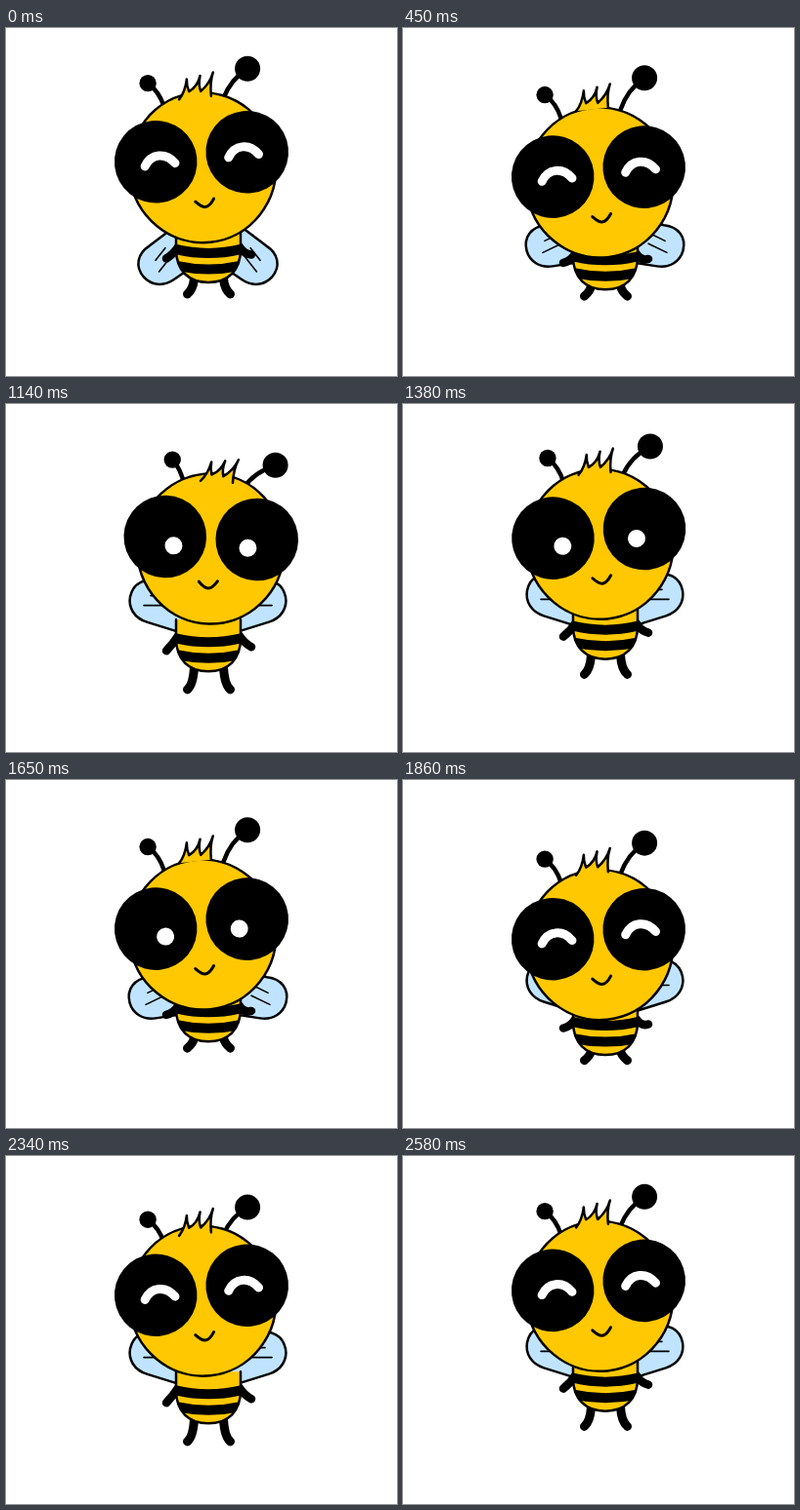
An HTML page with a canvas for the animation above (2.61 s loop, 400 by 357 pixels).

```html
<!DOCTYPE html>
<html lang="en">
<head>
<meta charset="utf-8">
<title>Hovering bee</title>
<style>
  html, body { margin: 0; width: 100%; height: 100%; overflow: hidden; background: #fff; }
  canvas { display: block; }
</style>
</head>
<body>
<canvas id="stage" width="400" height="357"></canvas>
<script>
const ctx = document.getElementById('stage').getContext('2d');
const LOOP = 2610, STEP = 30, BOB = 1200, FLAP = 120;
const YELLOW = '#ffc800', BLUE = '#c0e4ff', AXIS = 206.5;
const RAD = Math.PI / 180;

const wing = new Path2D('M24 18L56 8C69 4 75-7 73-18C70-32 58-38 44-33L10-24');
const wingLines = new Path2D('M36-19H52M38-9H59');
const torso = new Path2D('M174-54V-35C174-13 187-1 207-1S240-13 240-35V-54');
const stripes = new Path2D('M170-36Q207-26 244-36M170-19Q207-10 244-19');
const hair = new Path2D('M-15-132Q-8-139-5-152Q-6-145-4-139Q5-143 9-154Q6-145 8-138Q18-145 22.5-156Q18-146 18-132');
const mouth = new Path2D('M-9.5-26C-5-21-2.5-19.5 0-19.5S5.5-21 9.5-27');
const happyEye = new Path2D('M-15.5 3.5C-8-9 7-9 15.5 3.5');

// Vertical drop from the highest point; every part follows with its own lag.
const drop = (t, lag) => 13.3 * (1 - Math.cos(2 * Math.PI * Math.max(0, t - lag) / BOB));

// Head angle: resting to the left with one soft swing to the right.
function tilt(t) {
  const x = Math.max(-1, Math.min(1, (t - 980) / 440));
  return (-6.1 + 11.2 * Math.cos(x * Math.PI / 2) ** 2) * RAD;
}

function headPoint(x, y, t) {
  const a = tilt(t), c = Math.cos(a), s = Math.sin(a);
  return [206 + x * c - y * s, 203 + drop(t, 120) + x * s + y * c];
}

function paint(path, fill, stroke, width) {
  if (fill) {
    ctx.fillStyle = fill;
    ctx.fill(path);
  }
  if (stroke) {
    ctx.strokeStyle = stroke;
    ctx.lineWidth = width;
    ctx.stroke(path);
  }
}

function disc(x, y, r, color, ry = r) {
  const path = new Path2D();
  path.ellipse(x, y, r, ry, 0, 0, 2 * Math.PI);
  paint(path, color);
  return path;
}

function limb(x0, y0, cx, cy, x1, y1, width) {
  const path = new Path2D();
  path.moveTo(x0, y0);
  path.quadraticCurveTo(cx, cy, x1, y1);
  paint(path, null, '#000', width);
}

function at(x, y, draw) {
  ctx.save();
  ctx.translate(x, y);
  draw();
  ctx.restore();
}

function onHead(t, draw) {
  at(...headPoint(0, 0, t), () => {
    ctx.rotate(tilt(t));
    draw();
  });
}

function drawBody(t) {
  const fall = drop(t, 240), base = 262 + fall;
  const hand = 235.5 + drop(t, 290);
  const foot = 273 + drop(t, 340);
  const droop = 26 * RAD * (1 + Math.cos(2 * Math.PI * t / FLAP));

  for (const side of [-1, 1]) {
    at(AXIS, 209 + fall / 2, () => {
      ctx.scale(side, 1);
      ctx.translate(6.5, 0);
      ctx.rotate(droop);
      paint(wing, BLUE, '#000', 2.5);
      paint(wingLines, null, '#000', 1.6);
    });
    const x = dx => AXIS + 1 + side * dx;
    limb(x(31), base - 38, x(36), base - 30, x(43.5), hand - 1 - side * 2, 8.5);
    limb(x(15), base - 5, x(16), foot - 5, x(22), foot, 9);
  }

  at(0, base, () => {
    paint(torso, YELLOW);
    ctx.save();
    ctx.clip(torso);
    paint(stripes, null, '#000', 10);
    ctx.restore();
    paint(torso, null, '#000', 2.5);
  });
}

function drawAntenna(root, tip, r) {
  const [x0, y0] = root, [x1, y1] = tip;
  limb(x0, y0, x0 + (x1 - x0) * 0.3, y0 + (y1 - y0) * 0.65, x1, y1, 4.5);
  disc(x1, y1, r, '#000');
}

function drawHead(t) {
  const late = t - 50;
  drawAntenna(headPoint(-31, -126, late), headPoint(-45, -152, late), 8.7);
  drawAntenna(headPoint(30, -128, late), headPoint(58, -156, t - 85), 13);

  onHead(t, () => paint(disc(1.5, -60, 75, YELLOW, 77), null, '#000', 2.5));
  onHead(late, () => paint(hair, YELLOW, '#000', 2.5));

  const open = t >= 930 && t < 1860;
  onHead(t, () => {
    paint(mouth, null, '#000', 3);
    for (const [x, look] of [[-45.5, 1], [48.5, -1]]) {
      disc(x, -71, 42.3, '#000');
      if (open) disc(x + 9 * look, -62, 9, '#fff');
      else at(x + 4 * look, -71, () => paint(happyEye, null, '#fff', 9));
    }
  });
}

function render() {
  const t = Math.floor(performance.now() % LOOP / STEP) * STEP;
  ctx.fillStyle = '#fff';
  ctx.fillRect(0, 0, 400, 357);
  ctx.lineCap = ctx.lineJoin = 'round';
  drawBody(t);
  drawHead(t);
  requestAnimationFrame(render);
}
render();
</script>
</body>
</html>
```
